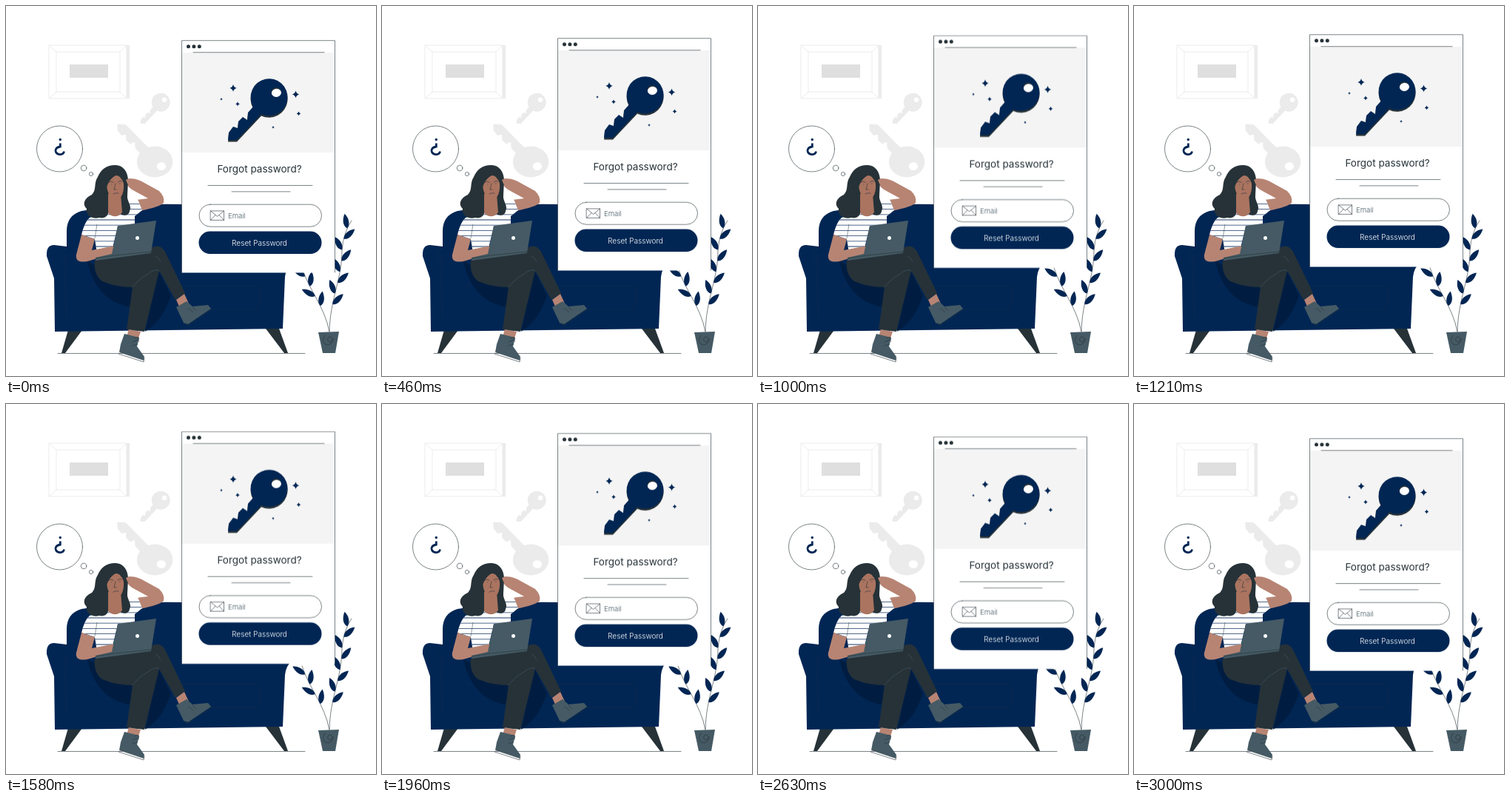
An HTML page that plays this animation: 500 by 500 pixels, repeating every 3040 ms.

```html
<!DOCTYPE html>
<html lang="en">
<head>
<meta charset="utf-8">
<title>Forgot password</title>
<style>
  html, body { margin: 0; width: 100%; height: 100%; overflow: hidden; background: #fff; }
  svg { display: block; width: 100vw; height: 100vh; }
  .navy { fill: #012654; }
  .deep { fill: #001d41; }
  .dark { fill: #263238; }
  .slate { fill: #455a64; }
  .skin { fill: #b78473; }
  .face { fill: #aa7460; }
  .white { fill: #fff; }
  .pale { fill: #ebebeb; }
  .line { fill: none; stroke: #263238; stroke-width: .6; stroke-linecap: round; stroke-linejoin: round; }
  .frame { fill: none; stroke: #e4e4e4; stroke-width: .7; }
  .seam { fill: none; stroke: #14294a; stroke-width: .7; }
  .fold { fill: none; stroke: #455a64; stroke-width: .6; }
  text { font-family: Inter, "Open Sans", sans-serif; }
  #window { animation: float 3040ms linear infinite; }
  /* 1.5 s up, 1.5 s down, then a 40 ms rest */
  @keyframes float {
    49.34% { transform: translateY(-10px); }
    98.68% { transform: none; }
  }
</style>
</head>
<body>
<svg viewBox="0 0 500 500" xmlns="http://www.w3.org/2000/svg">
  <defs>
    <path id="leaf" d="M0 0C6 -4 5 -13 1 -20C-4 -14 -5 -5 0 0Z"/>
    <path id="star" d="M0 -1Q.18 -.18 1 0Q.18 .18 0 1Q-.18 .18 -1 0Q-.18 -.18 0 -1Z"/>
    <!-- head centred on 0,0, bit pointing down left -->
    <path id="key" fill-rule="evenodd" d="M-24 12A25 25 0 1 1 -13 22L-46 57H-58L-57 47L-51 39L-45 41L-44 32L-38 26L-32 30L-31 20ZM7 -14A6.5 6.5 0 1 0 7 -1A6.5 6.5 0 1 0 7 -14Z"/>
    <clipPath id="shirt">
      <path d="M113 286L138 279Q148 288 157 279L168 261H178L184 276L174 284V296L151 298L143 331L123 334L120 315L102 309Q106 292 113 286Z"/>
    </clipPath>
  </defs>

  <g id="picture">
    <path class="pale" d="M163 53H167V125H163Z"/>
    <path class="frame" d="M58 53H163V125H58ZM68 62H154V116H68ZM58 53L68 62M163 53L154 62M58 125L68 116M163 125L154 116"/>
    <path fill="#dfdfdf" d="M86 79H138V97H86Z"/>
  </g>

  <g class="pale">
    <use href="#key" transform="translate(210.5 130.5) scale(.5)"/>
    <use href="#key" transform="translate(203.5 210) scale(.97 -.84) rotate(-3)"/>
  </g>

  <g id="thought">
    <circle class="line" cx="72.5" cy="193" r="31"/>
    <circle class="line" cx="105" cy="219" r="3.8"/>
    <circle class="line" cx="115" cy="227" r="2.6"/>
    <circle class="navy" cx="73.3" cy="180.5" r="1.7"/>
    <path d="M73.3 185.5V190C67.5 191 66 194.5 67.5 197.5C70 202 77.5 201.5 78.5 196.5" fill="none" stroke="#012654" stroke-width="2.8"/>
  </g>

  <g id="sofa">
    <path class="line" d="M70 469.5H404"/>
    <path class="dark" d="M84 438H103L80 469H75ZM351 436H369L381 469H376Z"/>
    <path class="navy" d="M82 325V304Q82 283 102 277Q165 266 240 268H355Q376 268 378 290V345H388Q378 354 377 366L374 436L66 440L65 368L55 338Q54 323 65 323Z"/>
    <path class="deep" d="M110 345Q122 400 170 407V375ZM206 358L223 391Q212 425 188 440Z"/>
    <path class="seam" d="M83 325Q73 330 75 340Q77 349 83 346M79 336Q83 350 80 366L82 425M112 378H122M234 378H342V410H270"/>
  </g>

  <g id="woman">
    <path class="skin" d="M163 234Q174 231 187 239L207 250Q215 258 213 266Q209 271 181 277L176 262L192 260L170 248Q162 243 163 234Z"/>
    <g clip-path="url(#shirt)">
      <path class="white" d="M98 255H190V340H98Z"/>
      <path d="M143 267V340" stroke="#1b3a66" stroke-width="90" stroke-dasharray=".8 6.4"/>
    </g>
    <path class="fold" d="M123 295L120 314"/>

    <path class="dark" d="M148 215C134 215 128 222 124 231C118 240 123 248 116 255C105 260 103 268 109 274C107 283 118 289 126 286C133 288 139 283 138 278H152C157 286 167 283 167 277C171 270 163 264 164 256L165 236C165 224 158 215 148 215Z"/>
    <path class="face" d="M138 254V280Q148 289 157 279L155 254Z"/>
    <path class="face" d="M136 239C138 226 158 226 159 238C160 250 157 260 149 263C141 261 136 252 136 239Z"/>
    <path class="dark" d="M134 252C129 232 139 222 152 222C162 223 165 236 160 247Q160 234 150 228Q138 233 134 252Z"/>
    <path class="skin" d="M162 235Q168 231 174 236L172 246Q165 245 162 235Z"/>
    <path class="line" d="M139 238Q142 236 145 238M151 238Q154 235 157 237M148 240L146 248H149M145 254Q148 252 152 253"/>
    <path class="line" stroke-width="2" d="M142.5 241H143M153.5 240H154"/>

    <path class="dark" d="M120 344L145 333L196 327Q208 320 215 332L242 388L229 397L207 358L187 440L163 437L171 380Q149 380 130 372Q118 363 120 344Z"/>
    <path class="fold" d="M207 358Q202 354 192 362Q179 369 171 380M202 338Q207 340 209 346"/>
    <path class="skin" d="M102 309L120 315L116 330L147 324L152 329L145 335L110 345Q93 348 95 336Z"/>
    <path class="slate" d="M151 297L203 290L196 334L121 344V340L143 335Z"/>
    <path class="line" d="M121 341L147 337L196 332"/>
    <circle class="white" cx="177.5" cy="313.5" r="2.5"/>

    <path class="skin" d="M230 397L241 389L247 402L235 408Z"/>
    <path class="slate" d="M230 407L244 399L252 406L273 404L277 409L246 430L240 428Z"/>
    <path class="line" d="M277 410.5L246 431.5L240 429M247 409L253 414M252 407L257 412"/>

    <path class="skin" d="M166 437L182 440L178 452L162 450Z"/>
    <path class="slate" d="M160 443L180 448L177 460L187 474L186 479L153 468L155 457Z"/>
    <path class="line" d="M152 470L186 481L187 476M171 454L178 451M171 459L178 457M174 449Q181 444 179 454"/>
  </g>

  <g id="plant">
    <path class="line stem" d="M437 440C438 395 454 370 454 330Q456 306 467 290"/>
    <path class="line stem" d="M437 440C430 405 410 385 400 354"/>
    <path class="slate" d="M422 441L450 440L445 469H428Z"/>
    <path class="line" d="M431 445Q426 452 431 457Q438 460 441 453Q442 447 437 447Q432 450 437 454Q440 455 443 450"/>
  </g>

  <g id="window">
    <path class="white" d="M237.5 46.8H444.5V360.5H237.5Z"/>
    <path fill="#f4f4f4" d="M238 63H444V198H238Z"/>
    <path class="line" d="M237.5 360V46.8H444.5V360M253 62.8H430M273 242.6H414M305 251H384"/>
    <path d="M246.5 54.8H262" fill="none" stroke="#263238" stroke-width="5" stroke-linecap="round" stroke-dasharray="0 7.4"/>
    <use href="#key" class="dark" transform="translate(358 126.5)"/>
    <use href="#key" class="navy" transform="translate(358 124)"/>
    <ellipse class="white" cx="365.7" cy="117.3" rx="6.2" ry="5.4"/>
    <g class="navy">
      <use href="#star" transform="translate(307 111) scale(4.8)"/>
      <use href="#star" transform="translate(391.5 119.5) scale(4.8)"/>
      <use href="#star" transform="translate(313 132.5) scale(2.8)"/>
      <use href="#star" transform="translate(395.5 145.5) scale(2.8)"/>
      <use href="#star" transform="translate(291 126) scale(1.8)"/>
      <use href="#star" transform="translate(361 164) scale(1.8)"/>
    </g>
    <text x="342.5" y="225.2" text-anchor="middle" font-size="13.5" fill="#263238">Forgot password?</text>
    <rect class="line" x="261" y="268.3" width="165.5" height="30" rx="15"/>
    <path class="line" d="M276.5 277H294.5V289.5H276.5ZL285.5 284.5L294.5 277M276.5 289.5L283 282.5M294.5 289.5L288 282.5"/>
    <text x="300" y="286.7" font-size="9.6" font-weight="300" fill="#455a64">Email</text>
    <rect class="navy" x="260.5" y="304.7" width="166" height="30.4" rx="15.2"/>
    <text x="342.5" y="323.9" text-anchor="middle" font-size="10.1" font-weight="300" fill="#fff">Reset Password</text>
  </g>
</svg>
<script>
  // Leaves grow on alternate sides from each tip downwards.
  const gap = 15, bare = 28, tilt = 32;
  for (const stem of document.querySelectorAll(".stem")) {
    const length = stem.getTotalLength();
    let side = -1;
    for (let s = length - 12; s > bare; s -= gap) {
      const a = stem.getPointAtLength(s), b = stem.getPointAtLength(s + 1);
      const heading = Math.atan2(b.x - a.x, a.y - b.y) * 180 / Math.PI;
      const leaf = document.createElementNS("http://www.w3.org/2000/svg", "use");
      leaf.setAttribute("href", "#leaf");
      leaf.setAttribute("class", "navy");
      leaf.setAttribute("transform", `translate(${a.x} ${a.y}) rotate(${heading + side * tilt}) scale(${side} 1)`);
      stem.after(leaf);
      side = -side;
    }
  }
</script>
</body>
</html>
```
